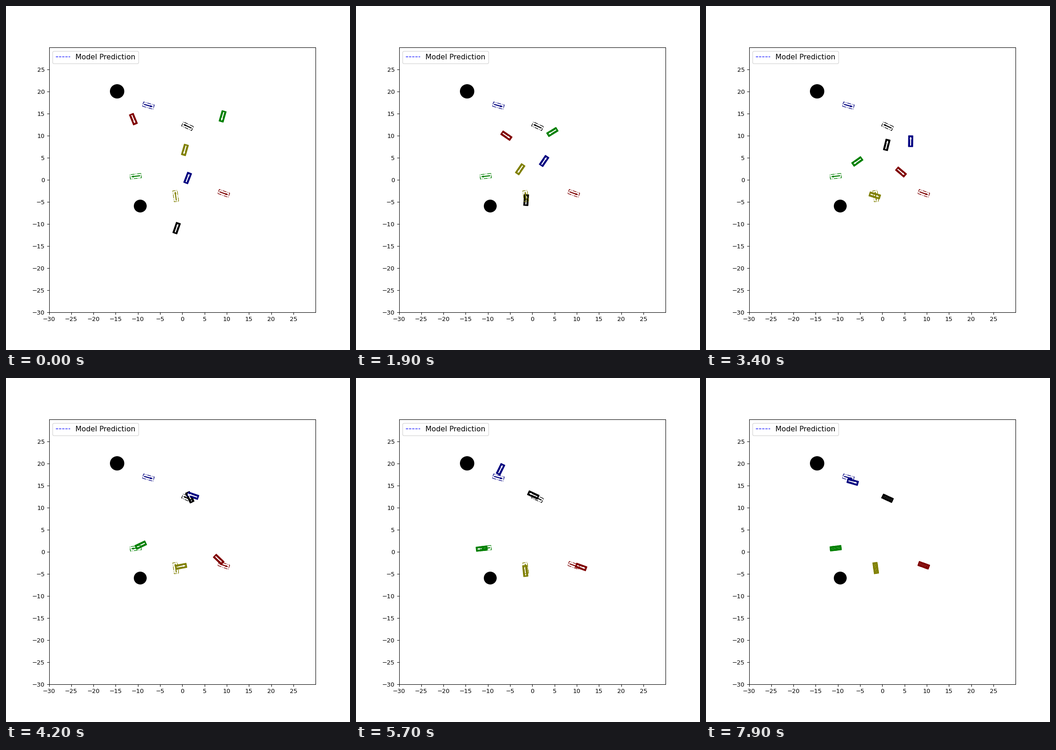
Animation, 748 px wide and 748 px high, one loop 8 s. Source, as a matplotlib script:

```python
import numpy as np
import matplotlib.pyplot as plt
from matplotlib.animation import FuncAnimation
from matplotlib.lines import Line2D
from matplotlib.patches import Circle, FancyArrow, Rectangle
from matplotlib.transforms import Affine2D

SIZE, INCHES = 748, 8
FRAMES, INTERVAL = 80, 100
LENGTH, WIDTH = 2.5, 1.0
STEPS = np.array([0, 10, 18, 28, 33, 37, 44, 49, 55, 63, 74])

fig, ax = plt.subplots(figsize=(INCHES, INCHES), dpi=SIZE / INCHES)
ax.set_xlim(-30, 30)
ax.set_ylim(-30, 30)
ax.set_xticks(np.arange(-30, 30, 5))
ax.set_yticks(np.arange(-30, 30, 5))


def to_data(x, y):
    box = ax.get_position()
    u = (x / SIZE - box.x0) / box.width
    v = (1 - y / SIZE - box.y0) / box.height
    return 60 * u - 30, 60 * v - 30


def place(parts, x, y, heading):
    move = Affine2D().rotate_deg(heading).translate(*to_data(x, y))
    for part in parts:
        part.set_transform(move + ax.transData)


def make_parts(color, goal, z):
    style = dict(fill=False, ec=color, ls="-.") if goal else dict(fc=color, ec=color)
    body = Rectangle((-LENGTH / 2, -WIDTH / 2), LENGTH, WIDTH, lw=1, zorder=z, **style)
    arrow = FancyArrow(-0.95, 0, 1.9, 0, width=0.1, length_includes_head=True,
                       color=color if goal else "white", lw=1, zorder=z + 0.1)
    for part in (body, arrow):
        ax.add_artist(part)
    return body, arrow


class Car:
    """Faces its direction of travel, then swings to the goal heading to park."""

    def __init__(self, color, start, path, goal, park, stop=None):
        place(make_parts(color, True, 3), *goal)
        self.parts = make_parts(color, False, 2)
        self.points = np.array(path + [stop or goal[:2]], float)
        self.slopes = np.gradient(self.points, STEPS, axis=0)
        angle = np.radians(start)
        self.slopes[0] = np.cos(angle), -np.sin(angle)
        self.slopes[-3:] = 0  # at rest for the gear change and when parked
        self.park = park
        self.entry = self.travel(park[0])
        self.swing = (goal[2] - self.entry + 180) % 360 - 180

    def position(self, t):
        t = min(t, STEPS[-1])
        i = min(np.searchsorted(STEPS, t, side="right") - 1, len(STEPS) - 2)
        h = STEPS[i + 1] - STEPS[i]
        s = (t - STEPS[i]) / h
        p, m = self.points[i:i + 2], self.slopes[i:i + 2] * h
        ease = s * s * (3 - 2 * s)
        return (p[0] + (p[1] - p[0]) * ease
                + s * (1 - s) * ((1 - s) * m[0] - s * m[1]))

    def travel(self, t):
        dx, dy = self.position(t + 0.01) - self.position(t)
        return np.degrees(np.arctan2(-dy, dx))

    def draw(self, t):
        begin, end = self.park
        if t < begin:
            heading = self.travel(t)
        else:
            s = min((t - begin) / (end - begin), 1)
            heading = self.entry + self.swing * s * s * (3 - 2 * s)
        place(self.parts, *self.position(t), heading)


for x, y, r in ((241.6, 185.6, 1.55), (291.9, 435, 1.38)):
    ax.add_patch(Circle(to_data(x, y), r, color="black"))

# Each path holds one pixel position per entry of STEPS; the last is the stop.
cars = [
    Car("black", 71,
        [(371, 483), (372, 463), (370, 422), (383, 341), (393, 302),
         (400, 273), (396, 255), (386, 253), (385, 254), (397, 262)],
        goal=(394.7, 261.5, 155), park=(42, 49)),
    Car("navy", 69,
        [(395, 374), (400, 357), (409, 337), (435, 309), (445, 294),
         (439, 272), (378, 245), (342, 224), (315, 197), (299, 228)],
        goal=(309.5, 216.5, -16), park=(49, 63), stop=(319, 226)),
    Car("maroon", -68,
        [(277, 246), (291, 261), (327, 282), (393, 333), (424, 361),
         (445, 378), (473, 404), (485, 410), (490, 411), (476, 408)],
        goal=(473.5, 407.3, -20), park=(40, 49)),
    Car("green", -106,
        [(471, 240), (460, 254), (427, 274), (359, 316), (329, 338),
         (309, 352), (284, 369), (275, 371), (273, 371), (282, 370)],
        goal=(282, 370.2, -173), park=(36, 49)),
    Car("olive", -106,
        [(389, 313), (381, 331), (357, 355), (342, 395), (367, 412),
         (380, 410), (377, 411), (369, 418), (368, 420), (369, 412)],
        goal=(369, 413.2, 98), park=(33, 58)),
]

ax.legend(handles=[Line2D([], [], color="blue", ls="--", lw=1, label="Model Prediction")],
          loc="upper left", fontsize=12)


def update(frame):
    for car in cars:
        car.draw(max(frame - 1, 0))
    return [part for car in cars for part in car.parts]


anim = FuncAnimation(fig, update, frames=FRAMES, interval=INTERVAL,
                     repeat=True, repeat_delay=0, blit=False)
plt.show()
```
